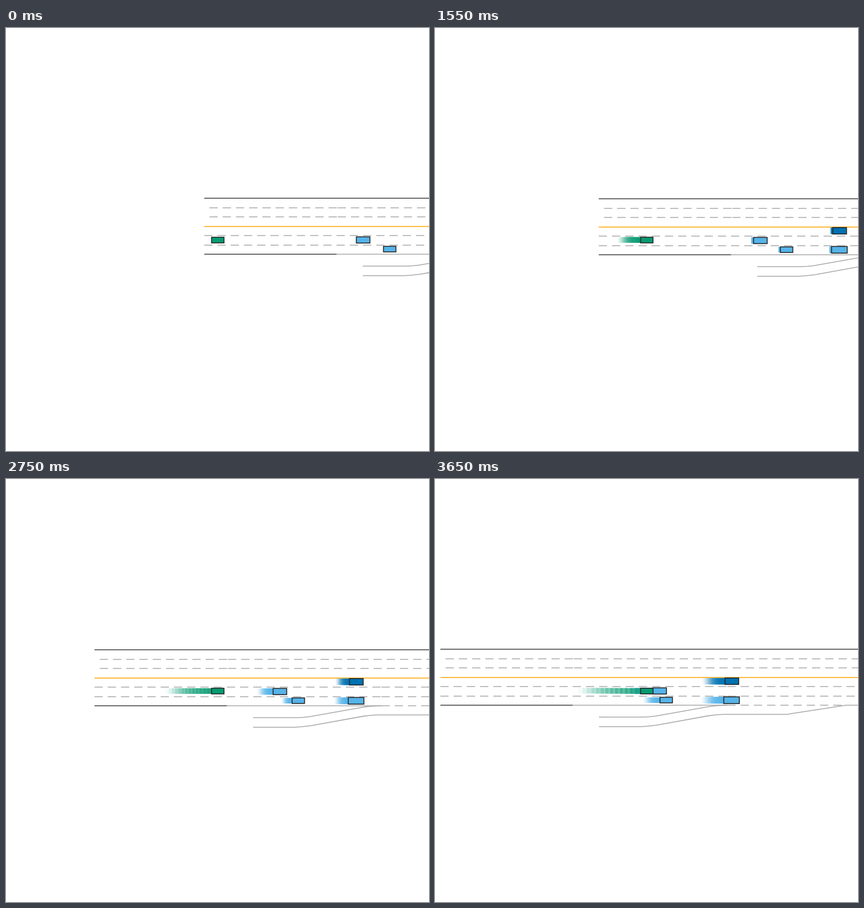
These frames come from a looping animation (748x748 px, 3.7 s). An HTML page with a canvas:

```html
<!DOCTYPE html>
<html lang="en">
<head>
<meta charset="utf-8">
<title>Highway ramp</title>
<style>
html, body { margin: 0; width: 100%; height: 100%; overflow: hidden; background: #fff; }
canvas { display: block; }
</style>
</head>
<body>
<canvas id="c" width="748" height="748"></canvas>
<script>
const ctx = document.getElementById('c').getContext('2d');
const SIZE = 748, STEP = 50, STEPS = 74, TRAIL = 14;
const DARK = '#3c3c3c', GRAY = '#a9a9a9', ORANGE = '#ffa500', FAR = 1200;
const LEFT = 350.5, MERGE = 584.5, JOIN = 858, RAMP_END = 1068;
const DASH = 14.6, PERIOD = 23.4;

// Distance driven by the followed car after n steps.
const travel = n => Math.max(0, n * (-0.12 + 0.068 * n - 0.000031 * n * n));

// Sideways drift of the followed car, interpolated between key steps.
const DRIFT = [[0, 0], [12, 0], [16, 0.7], [20, 1.45], [31, 1], [61, 0.8], [73, 0.1]];
function drift(n) {
  let i = 1;
  while (i < DRIFT.length - 1 && DRIFT[i][0] < n) i++;
  const [n0, v0] = DRIFT[i - 1], [n1, v1] = DRIFT[i];
  return v0 + (v1 - v0) * (n - n0) / (n1 - n0);
}

// Cars that pull away from rest at step n0.
const follow = (x, y, rate, n0) => n => ({ x: x + (rate * Math.max(0, n - n0)) ** 2, y, a: 0 });

const CARS = [
  { w: 24, h: 11, color: '#56b4e9', pose: follow(631.5, 374.8, 0.1955, 20) },
  { w: 22, h: 9.8, color: '#56b4e9', pose: follow(678.5, 391, 0.155, 18.3) },
  { w: 27.6, h: 11.8, color: '#56b4e9', pose: follow(771.5, 391.2, 0.182, 19.6) },
  { w: 24.2, h: 11.4, color: '#0072b2', pose: follow(772, 357.6, 0.182, 19.6) },
  { w: 22, h: 10, color: '#079b72', ego: true, pose: n => ({
    x: 374.5 + travel(n),
    y: 375 - drift(n),
    a: -0.065 * Math.exp(-(((n - 16) / 3) ** 2))
  }) }
];

function line(color, points) {
  ctx.strokeStyle = color;
  ctx.beginPath();
  for (const [x, y] of points) ctx.lineTo(x, y);
  ctx.stroke();
}

function dashes(y, from, to) {
  ctx.setLineDash([DASH, PERIOD - DASH]);
  line(GRAY, [[from, y], [to, y]]);
  ctx.setLineDash([]);
}

function drawRoad() {
  ctx.lineWidth = 1.6;
  line(DARK, [[LEFT, 301], [FAR, 301]]);
  for (const y of [318, 334]) {
    dashes(y, 359.8, MERGE + 0.5);
    dashes(y, 586.5, FAR);
  }
  for (const y of [367, 384]) {
    dashes(y, LEFT, JOIN - 1);
    dashes(y, JOIN, FAR);
  }
  line(GRAY, [[MERGE, 400], [JOIN, 400]]);
  dashes(400, JOIN, RAMP_END);
  line(DARK, [[LEFT, 400], [MERGE, 400]]);
  line(GRAY, [[631, 421], [707, 421], [719, 420.5], [731, 419.2], [824, 402.8], [838, 401], [JOIN, 400]]);
  line(GRAY, [[631, 438], [704, 438], [718, 437], [733, 435.3], [825, 418.6], [838, 417],
    [850, 416.2], [964, 416.2], [972, 414.8], [RAMP_END, 400], [FAR, 400]]);
  line(ORANGE, [[LEFT, 351], [FAR, 351]]);
}

function box(car, p, alpha, outline) {
  ctx.save();
  ctx.translate(p.x, p.y);
  ctx.rotate(p.a);
  ctx.globalAlpha = alpha;
  ctx.fillStyle = car.color;
  ctx.fillRect(-car.w / 2, -car.h / 2, car.w, car.h);
  if (outline) {
    ctx.strokeStyle = '#262626';
    ctx.lineWidth = 1.6;
    ctx.strokeRect(-car.w / 2, -car.h / 2, car.w, car.h);
  }
  ctx.restore();
}

function draw(n) {
  const d = travel(n), s = drift(n);
  const snap = s > 0.5 ? 1 : 0;
  ctx.fillStyle = '#fff';
  ctx.fillRect(0, 0, SIZE, SIZE);

  ctx.save();
  ctx.translate(-Math.floor(d + 0.3), snap);
  drawRoad();
  ctx.restore();

  for (const car of CARS) {
    ctx.save();
    ctx.translate(-d, car.ego ? s : snap);
    for (let k = Math.min(n, TRAIL - 1); k > 0; k--) {
      box(car, car.pose(n - k), 0.6 * (1 - k / TRAIL), false);
    }
    box(car, car.pose(n), 1, true);
    ctx.restore();
  }
}

const start = performance.now();
function tick() {
  const t = performance.now() - start;
  draw(Math.floor(t / STEP) % STEPS);
  requestAnimationFrame(tick);
}
tick();
</script>
</body>
</html>
```
